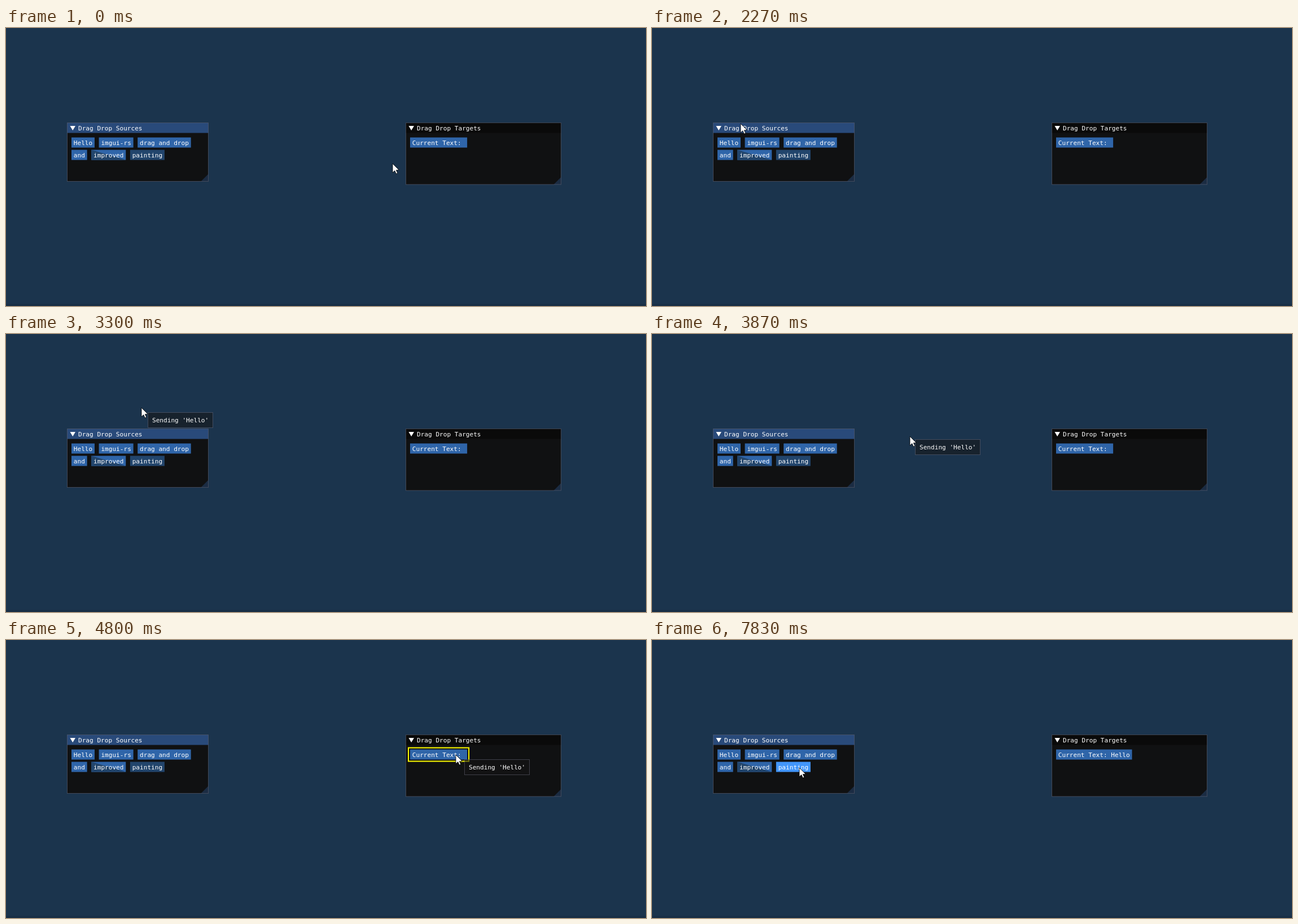
Recreate the animation shown at these times as an HTML page. Size 1134x494 px, loop 8 s.

```html
<!DOCTYPE html>
<html lang="en">
<head>
<meta charset="utf-8">
<title>Drag and drop</title>
<style>
  html, body { margin: 0; width: 100%; height: 100%; overflow: hidden; background: #1b344d; }
  svg { display: block; width: 100%; height: 100%; }
  text { font: 11.1px "DejaVu Sans Mono", monospace; fill: #fff; white-space: pre; }
  .edge { fill: none; stroke: #6e6e80; stroke-opacity: .5; }
</style>
</head>
<body>
<svg id="stage" viewBox="0 0 1134 494"></svg>
<script>
const LOOP = 8000, TICK = 100 / 3;
const HOVER = '#4296fa', ACTIVE = '#0f87fa', BLUE = '#2f65a9', DIM = '#22456c';
const CHAR = 6.68, PAD = 3.8, GAP = 7.6, ROW = 22, HEIGHT = 18;
const PRESS = 2660, DRAG = 2790, DROP = 5766;
const stage = document.getElementById('stage');

function set(el, attrs) {
  for (const k in attrs) el.setAttribute(k, attrs[k]);
  return el;
}
function add(tag, attrs, parent = stage, text = '') {
  const el = set(document.createElementNS('http://www.w3.org/2000/svg', tag), attrs);
  el.textContent = text;
  return parent.appendChild(el);
}
const rect = (x, y, width, height, fill, parent) => add('rect', { x, y, width, height, fill }, parent);
const label = (x, y, text, parent) => add('text', { x, y }, parent, text);
const poly = (points, fill, parent) => add('polygon', { points, fill }, parent);
const frame = (x, y, width, height, parent) => add('rect', { x, y, width, height, class: 'edge' }, parent);
const show = (el, on) => set(el, { visibility: on ? 'visible' : 'hidden' });

function panel(x, y, w, h, title, bar) {
  const r = x + w, b = y + h;
  rect(x, y, w, h, '#101112');
  rect(x, y, w, 18, bar);
  poly(`${r},${b - 13} ${r},${b} ${r - 13},${b}`, '#1b2c43');
  frame(x, y, w, h);
  poly(`${x + 5},${y + 5.5} ${x + 14.5},${y + 5.5} ${x + 9.7},${y + 13.5}`, '#fff');
  label(x + 19.5, y + 13.5, title);
}

const buttonWidth = text => text.length * CHAR + 2 * PAD;

function button(x, y, text) {
  const w = buttonWidth(text), fill = text === 'painting' ? DIM : BLUE;
  const box = rect(x, y, w, HEIGHT, fill);
  return { x, y, w, fill, box, text: label(x + PAD, y + 13.5, text) };
}

function buttonRow(x, y, words) {
  return words.map(word => {
    const b = button(x, y, word);
    x += b.w + GAP;
    return b;
  });
}

rect(0, 0, 1134, 494, '#1b344d');
rect(0, 490.5, 1134, 3.5, '#182e45');
panel(108.5, 168.5, 250, 104, 'Drag Drop Sources', '#294a7a');
panel(708.5, 168.5, 275, 109.5, 'Drag Drop Targets', '#0a0a0a');

const top1 = 194.5;
const sources = [
  ...buttonRow(116, top1, ['Hello', 'imgui-rs', 'drag and drop']),
  ...buttonRow(116, top1 + ROW, ['and', 'improved', 'painting'])
];
const hello = sources[0], improved = sources[4];
const target = button(716, top1, 'Current Text: ');
const buttons = [...sources, target];

// Half of this button is dim
const { x: ix, y: iy, w: iw } = improved;
const shade = poly(`${ix},${iy} ${ix + iw},${iy + HEIGHT} ${ix},${iy + HEIGHT}`, DIM);
stage.insertBefore(shade, improved.text);

const ring = frame(target.x - 3, target.y - 3, target.w + 6, HEIGHT + 6);
set(ring, { class: '', fill: 'none', stroke: '#ff0', 'stroke-width': 2 });

const tip = add('g', {});
set(rect(.5, .5, 115, 27, '#141414', tip), { 'fill-opacity': .56 });
frame(.5, .5, 115, 27, tip);
label(8, 18, "Sending 'Hello'", tip);

const cursor = poly('0,0 0,16 3.8,12.6 6.3,18 8.8,16.9 6.4,11.6 11.2,11.2', '#fff');
set(cursor, { stroke: '#000', 'stroke-width': .8 });

const ease = u => u - .05 * Math.sin(2 * Math.PI * u);
const mix = (a, b, u) => a + (b - a) * u;

// Curves from point to point, bent towards an optional third point
const curve = (a, b, bend) => u => [0, 1].map(i => bend
  ? mix(mix(a[i], bend[i], u), mix(bend[i], b[i], u), u)
  : mix(a[i], b[i], u));

// The drag sways across the stage as one sine wave
function sway(u) {
  const x = mix(188, 797, u);
  return [x, 185.8 + 58 * Math.sin((x - 464) / 118)];
}

const right = [685, 241], above = [187, 156], grab = [138, 203], nudge = [146, 203];
const title = [157, 169.5], lift = sway(0), goal = sway(1);
const back = [242, 237], word = [182, 221], rest = [261, 227];
const moves = [
  { from: 0, to: 133, at: curve(right, above) },
  { from: 270, to: 867, at: curve(above, grab, [285, 190]) },
  { from: 1033, to: 1233, at: curve(grab, nudge) },
  { from: 1667, to: 2033, at: curve(nudge, title) },
  { from: 2267, to: 3067, at: curve(title, lift, [130, 235]) },
  { from: 3100, to: 4785, at: sway },
  { from: 6033, to: 6867, at: curve(goal, back, [283, 389]) },
  { from: 6867, to: 7467, at: curve(back, word) },
  { from: 7600, to: 7833, at: curve(word, rest) }
];

function pointer(t) {
  const m = moves.filter(m => t >= m.from).pop() || moves[0];
  const u = (t - m.from) / (m.to - m.from);
  return m.at(ease(Math.min(1, Math.max(0, u))));
}

const over = (b, x, y) => x >= b.x && x < b.x + b.w && y >= b.y && y < b.y + HEIGHT;
const place = (el, x, y) => set(el, { transform: `translate(${Math.round(x)} ${Math.round(y)})` });

function draw(now) {
  const t = Math.floor((now % LOOP + 4) / TICK) * TICK;
  const [x, y] = pointer(t);
  const dragging = t >= DRAG && t < DROP;
  const held = t >= PRESS && t < DROP;

  const text = 'Current Text: ' + (t >= DROP ? 'Hello' : '');
  target.w = buttonWidth(text);
  set(target.box, { width: target.w });
  target.text.textContent = text;

  for (const b of buttons) {
    let fill = b.fill;
    if (over(b, x, y)) {
      if (!held) fill = HOVER;
      else if (b === hello) fill = ACTIVE;
    }
    set(b.box, { fill });
  }
  show(shade, held || !over(improved, x, y));
  show(ring, dragging && over(target, x, y));
  show(tip, dragging);

  // The tooltip trails the pointer slightly
  const [tx, ty] = pointer(t - 12);
  place(tip, tx + 15, ty + 8);
  place(cursor, x, y);
}

const start = performance.now();
function loop() {
  draw(performance.now() - start);
  requestAnimationFrame(loop);
}
loop();
</script>
</body>
</html>
```
